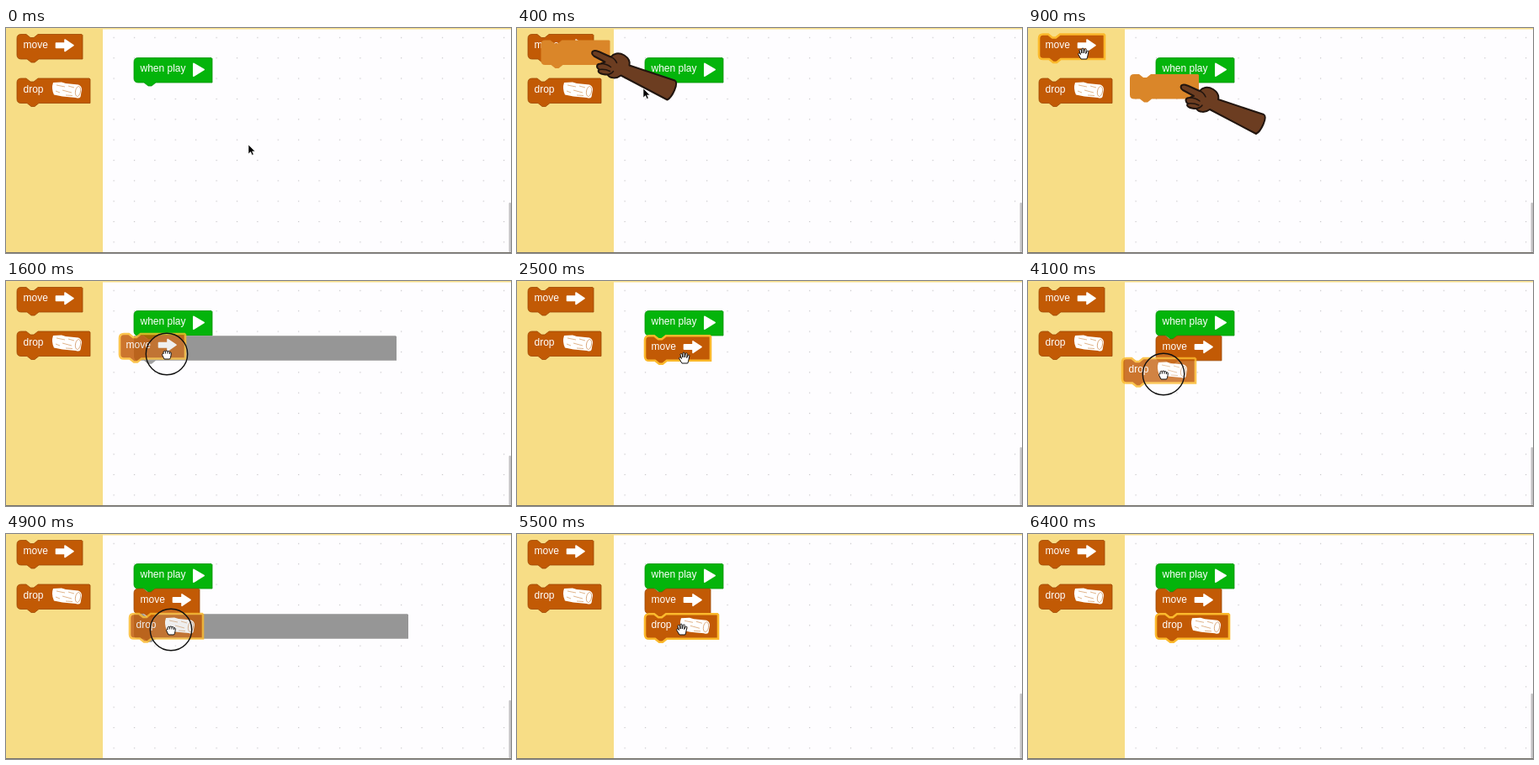
Write an HTML page that moves like this. It is 600 px wide and 268 px high and loops after 6500 ms.

```html
<!DOCTYPE html>
<html lang="en">
<head>
<meta charset="utf-8">
<title>Block coding</title>
<style>
html, body { margin: 0; width: 100%; height: 100%; overflow: hidden; background: #fefdff; }
svg { display: block; width: 600px; height: 268px; }
text { font: 12px "Liberation Sans", Arial, sans-serif; fill: #fff; }
</style>
</head>
<body>
<svg id="stage" viewBox="0 0 600 268">
  <defs>
    <pattern id="dots" x="127.5" y="10.8" width="24.4" height="24.36" patternUnits="userSpaceOnUse">
      <rect width="1.2" height="1.2" fill="#c4c3c6"/>
    </pattern>
  </defs>
  <rect width="600" height="268" fill="#fefdff"/>
  <rect x="115" y="2" width="485" height="265" fill="url(#dots)"/>
  <rect width="115" height="268" fill="#f7dd86"/>
  <rect width="600" height="1.5" fill="#f8df8b"/>
  <rect y="267" width="600" height="1" fill="#77736c"/>
</svg>
<script>
const LOOP = 6500, STEP = 100;
const ORANGE = '#c25a05', GREEN = '#04b40b', GLOW = '#fbb92c';
const stage = document.getElementById('stage');

function add(parent, tag, attrs = {}) {
  const node = document.createElementNS(stage.namespaceURI, tag);
  for (const key in attrs) node.setAttribute(key, attrs[key]);
  parent.append(node);
  return node;
}
const group = (attrs, parent = stage) => add(parent, 'g', attrs);
const shape = (parent, d, attrs) => add(parent, 'path', { d, ...attrs });
const place = (node, [x, y]) => node.setAttribute('transform', `translate(${x} ${y})`);
const show = (node, on) => node.setAttribute('visibility', on ? 'inherit' : 'hidden');

function outline(width, notched = true) {
  const notch = notched ? 'H11l5 4h4l5-4' : '';
  return `M0 5Q0 0 5 0${notch}H${width - 1}l1 1V29.5H26l-5 4h-4l-5-4H5Q0 29.5 0 24.5Z`;
}

const icons = {
  play: g => shape(g, 'M71 7L83 14L71 21.5Z',
    { fill: '#fff', stroke: '#fff', 'stroke-width': 2, 'stroke-linejoin': 'round' }),
  move: g => shape(g, 'M46.5 10.5H57V6.5L67 13.2L57 20V16H46.5Z',
    { fill: '#fff', stroke: '#fff', 'stroke-width': 1.6, 'stroke-linejoin': 'round' }),
  drop: g => {
    shape(g, 'M43 5L53 4.5L58 6L73 7.5Q77 9 77 13.5L75.5 22Q74 24.5 70 23L54 21.5L44 19.5Q40.5 12 43 5Z',
      { fill: '#fff' });
    shape(g, 'M47 8L57 10M54 14L65 17M46 15L51 17M61 9L68 11M58 20L66 20.5',
      { fill: 'none', stroke: '#d9a26f', 'stroke-width': .8 });
    add(g, 'ellipse', { cx: 72.5, cy: 15.5, rx: 3, ry: 6, transform: 'rotate(10 72.5 15.5)',
      fill: '#fff', stroke: '#d39a68', 'stroke-width': .8 });
  }
};
const kinds = {
  play: { label: 'when play', width: 93, fill: GREEN, edge: '#049409' },
  move: { label: 'move', width: 78, fill: ORANGE, edge: '#9e4803' },
  drop: { label: 'drop', width: 87, fill: ORANGE, edge: '#9e4803' }
};

function block(kind, at, glowing = false) {
  const { label, width, fill, edge } = kinds[kind];
  const g = group();
  const d = outline(width, kind !== 'play');
  shape(g, d, { fill, stroke: edge, 'stroke-width': .8 });
  const glow = shape(g, d, { fill: 'none', stroke: GLOW, 'stroke-width': 2.6 });
  add(g, 'text', { x: 7.5, y: 16.5 }).textContent = label;
  icons[kind](g);
  place(g, at);
  show(glow, glowing);
  return { g, glow };
}

function marker(width, at) {
  const g = group();
  shape(g, outline(width).replace('M0 5Q0 0 5 0', 'M0 0'), { fill: '#969696' });
  place(g, at);
  return g;
}

const menu = { move: block('move', [13, 7.5]), drop: block('drop', [13, 60]) };
block('play', [152, 35.5]);
const markers = { move: marker(312, [152, 65.3]), drop: marker(326, [152, 95.3]) };
const placed = { move: block('move', [152, 65.3]), drop: block('drop', [152, 95.3]) };
const dragged = { move: block('move', [0, 0], true), drop: block('drop', [0, 0], true) };
for (const { g } of Object.values(dragged)) g.setAttribute('opacity', .83);
const scrollbar = add(stage, 'rect', { x: 597.5, width: 2.5, rx: 1, fill: '#c3c2c4' });

// Hint: a plain block pulled along by a pointing hand
const hint = group();
shape(hint, outline(82), { fill: '#da8629' });
shape(hint, `M62 13C65 11 69 14 83 20C86 16 92 14 99 18C105 22 106 26 105 30L159 48
  C164 51 156 68 150 71L95 42C90 46 82 46 79 41C71 41 66 38 69 35C65 32 66 28 71 28L76 26L63 19
  C60 17 60 14 62 13Z`,
  { fill: '#6c3d21', stroke: '#21150f', 'stroke-width': 2, 'stroke-linejoin': 'round' });
shape(hint, 'M83 20Q88 22 90 27M71 28Q78 28 83 32M69 35Q76 34 82 37M79 41Q84 40 86 37',
  { fill: 'none', stroke: '#21150f', 'stroke-width': 1.5, 'stroke-linecap': 'round' });

const ring = add(stage, 'circle',
  { r: 24.7, fill: '#fff', 'fill-opacity': .1, stroke: '#111', 'stroke-width': 1.4 });
const cursor = group();
const ink = { fill: '#fff', stroke: '#111', 'stroke-width': 1, 'stroke-linejoin': 'round' };
const pointers = {
  arrow: shape(cursor, 'M0 0V11L2.6 8.6L4.4 12.4L6.2 11.6L4.6 7.9H8Z',
    { fill: '#000', stroke: '#fff', 'stroke-width': .6 }),
  open: shape(cursor, `M-3 6L-6 1C-7-1-5-2-4 0L-3.5.5L-5-4C-5-6-3-6-2.6-4L-2-1V-6C-1.8-7.3 0-7.3 0-6
    L.3-1L1.3-5.5C2-7 3.6-6 3.2-4.6L2.7-.5L4.2-3.5C5.2-4.6 6.4-3.6 5.8-2.2C5 1 5 3 3.8 6Z`, ink),
  closed: shape(cursor, `M-3 6L-5 2C-6 0-5-1-4 0V-2C-4-4-2-4-1.6-3C-1-4.3.8-4.3 1-3
    C2-4 3.4-3.4 3.4-2C5-2.8 5.6-1.4 5.2 0C5 2 4.8 4 3.6 6ZM-1.6-3V-.5M1-3V-.5M3.4-2V0`, ink)
};

// Steps: [time, x, y]
const cursorSteps = [
  [0, 288, 139], [100, 284, 137], [400, 150, 72], [700, 68, 33], [900, 66, 31], [1100, 66, 31],
  [1300, 110, 48], [1500, 181, 81], [1600, 191, 87], [1900, 198, 92], [2100, 199, 92],
  [2800, 199, 92], [3100, 118, 87], [3400, 62, 80], [3700, 62, 80],
  [3900, 105, 95], [4100, 161, 111], [4200, 184, 114], [4500, 196, 114]
];
const hintSteps = [[300, 13, 8], [500, 44, 21], [700, 84, 38], [900, 121, 55], [1000, 133, 61]];
const drags = {
  move: { press: 900, grab: 1100, near: 1500, release: 2200, offset: [56, 24], blur: 3500 },
  drop: { press: 3500, grab: 3700, near: 4200, release: 5100, offset: [49, 19], blur: LOOP }
};
const CURSOR_GONE = 6100;

function positionAt(steps, t) {
  const next = steps.findIndex(step => step[0] > t);
  if (next === 0) return steps[0].slice(1);
  if (next < 0) return steps.at(-1).slice(1);
  const [t0, x0, y0] = steps[next - 1], [t1, x1, y1] = steps[next];
  const k = (t - t0) / (t1 - t0);
  return [x0 + (x1 - x0) * k, y0 + (y1 - y0) * k];
}

function render(t) {
  const within = (from, to) => t >= from && t < to;
  const [x, y] = positionAt(cursorSteps, t);
  let holding = false;

  for (const kind in drags) {
    const { press, grab, near, release, offset, blur } = drags[kind];
    const active = within(grab, release);
    holding ||= active;
    show(menu[kind].glow, within(press, grab));
    show(dragged[kind].g, active);
    show(dragged[kind].glow, active);
    place(dragged[kind].g, [x - offset[0], y - offset[1]]);
    show(markers[kind], within(near, release));
    show(placed[kind].g, t >= release);
    show(placed[kind].glow, within(release, blur));
  }

  show(hint, within(300, 1100));
  place(hint, positionAt(hintSteps, t));

  const top = t < drags.move.release ? 208 : t < drags.drop.release ? 198 : 190;
  scrollbar.setAttribute('y', top);
  scrollbar.setAttribute('height', 267 - top);

  const overBlock = x < 100 || (x >= 152 && t >= drags.move.release);
  const pointer = holding ? 'closed' : overBlock ? 'open' : 'arrow';
  for (const name in pointers) show(pointers[name], t < CURSOR_GONE && name === pointer);
  place(cursor, [x, y]);
  place(ring, [x, y]);
  show(ring, holding);
}

const start = performance.now();
function tick() {
  const elapsed = (performance.now() - start) % LOOP;
  render(Math.floor(elapsed / STEP) * STEP);
  requestAnimationFrame(tick);
}
tick();
</script>
</body>
</html>
```
